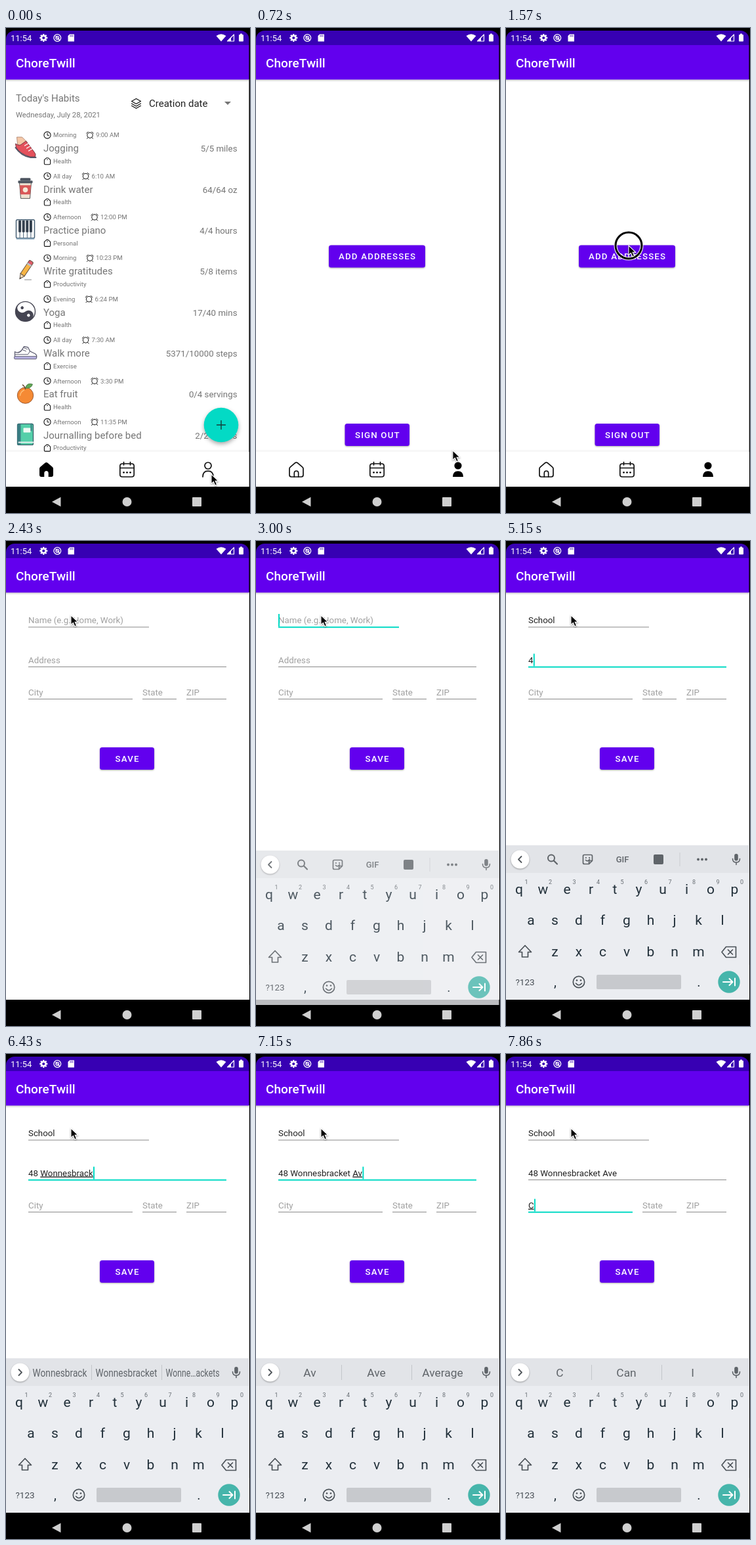
These frames come from a looping animation (372 by 738 pixels, 8000 ms). An HTML page:

```html
<!DOCTYPE html>
<html lang="en">
<head>
<meta charset="utf-8">
<title>Habit app walkthrough</title>
<style>
html, body { margin: 0; width: 100%; height: 100%; overflow: hidden; background: #000; }
svg { display: block; width: 372px; height: 738px; font-family: Roboto, sans-serif; }
text { white-space: pre; }
.mid { text-anchor: middle; }
.end { text-anchor: end; }
.bold { font-weight: 500; }
.line { fill: none; stroke: #111; stroke-linecap: round; stroke-linejoin: round; }
.raised { filter: drop-shadow(0 1.5px 1.2px #0005); }
</style>
</head>
<body>
<svg id="stage" viewBox="0 0 372 738"></svg>
<script>
const LOOP = 8000, STEP = 1000 / 7;
const PURPLE = '#6200ee', TEAL = '#03dac5', GREY = '#757575';

const text = (x, y, s, size, fill, cls = '') =>
  `<text x="${x}" y="${y}" font-size="${size}" fill="${fill}" class="${cls}">${s}</text>`;
const rect = (x, y, w, h, fill, rx = 0, extra = '') =>
  `<rect x="${x}" y="${y}" width="${w}" height="${h}" fill="${fill}" rx="${rx}" ${extra}/>`;
const disc = (x, y, r, fill, extra = '') => `<circle cx="${x}" cy="${y}" r="${r}" fill="${fill}" ${extra}/>`;
const shape = (d, fill, extra = '') => `<path d="${d}" fill="${fill}" ${extra}/>`;
const line = (d, w = 1, stroke = '#111') => `<path class="line" d="${d}" style="stroke:${stroke};stroke-width:${w}"/>`;
const at = (x, y, body) => `<g transform="translate(${x} ${y})">${body}</g>`;
const group = (id, body) => `<g id="${id}">${body}</g>`;
const ring = (x, y, r, w = 1, stroke = '#111') => disc(x, y, r, 'none', `stroke="${stroke}" stroke-width="${w}"`);

// Small icons, each drawn around 0,0
const clock = ring(0, 0, 5.1, 1.1) + line('M0-3V.3H2.5');
const alarm = ring(0, .2, 4.2) + line('M-5.3-2.6L-2.8-5M5.3-2.6L2.8-5M-3 3.7L-4.6 5.3M3 3.7L4.6 5.3');
const tag = line('M-4.6-1.8L-1.2-4.8H1.2L4.6-1.8V3.7Q4.6 5.2 3.2 5.2H-3.2Q-4.6 5.2-4.6 3.7Z', 1.1) + disc(0, -2.2, .8, '#111');

const pictures = {
  shoe: shape('M-13-16H-5L3-8-4-1-12-5Z', '#f4c8a8', 'stroke="#a67b68" stroke-width=".8"') +
    shape('M-15-6Q-9-2-6-5L1-10 13 6Q17 10 15 14H7Q-8 9-14 0Z', '#e4515c', 'stroke="#783b45"') +
    line('M-15 0Q-6 13 8 15H16', 2, '#555566') + line('M-1-3L4-6M2 1L7-2M5 5L10 2', 1.3, '#fff'),
  cup: shape('M-9-9H9L7 15H-7Z', '#f0e3d2', 'stroke="#555"') + shape('M-8.6-5H8.6L7.5 9H-7.5Z', '#d95858') +
    disc(0, 2, 3.8, '#f7ead8') + rect(-11, -12, 22, 4, '#4d5560', 1) + rect(-8, -16, 16, 4, '#4d5560', 1.5),
  piano: rect(-14, -15, 28, 28, '#fff', 2, 'stroke="#476075" stroke-width="1.5"') +
    line('M-8.4 0V13M-2.8 0V13M2.8 0V13M8.4 0V13', 1, '#476075') +
    [-10.4, -4.8, .8, 6.4].map(x => rect(x, -14, 4, 18, '#34404e', .8)).join('') + line('M-13 14H13', 2, '#8ca8bd'),
  pencil: `<g transform="rotate(34)">` + rect(-3.6, -12, 7.2, 20, '#f7b545', 0, 'stroke="#665544"') +
    rect(-3.6, -17, 7.2, 6, '#df5b68', 2, 'stroke="#665544"') + rect(-3.6, -12, 7.2, 2.5, '#b9c0c7') +
    shape('M-3.6 8H3.6L0 15Z', '#f5dcb8', 'stroke="#665544"') + shape('M-1.2 13H1.2L0 16Z', '#333') + '</g>' +
    line('M-1 14H9', 1, '#888'),
  yinyang: disc(0, 0, 15, '#fff', 'stroke="#454552" stroke-width="1.4"') +
    shape('M0-15A15 15 0 0 0 0 15A7.5 7.5 0 0 0 0 0A7.5 7.5 0 0 1 0-15', '#454552', 'transform="rotate(-40)"') +
    `<g transform="rotate(-40)">` + disc(0, -7.5, 2.3, '#454552') + disc(0, 7.5, 2.3, '#fff') + '</g>',
  sneaker: shape('M-16-1Q-10 2-6-3L-2-9 4-8 7-2 15 2Q18 4 17 8H-16Z', '#fff', 'stroke="#5c5c70" stroke-width="1.3"') +
    rect(-17, 6, 34, 4, '#b9b3e4', 1.5, 'stroke="#5c5c70"') + line('M-4-4L1-2M-2-7L3-5M7-2L4 3H-15', 1, '#5c5c70'),
  orange: disc(0, 3, 12.2, '#f58a34', 'stroke="#9c5b34"') + shape('M0-8Q2-17 11-14Q9-7 0-8', '#62a955', 'stroke="#3f6f3f" stroke-width=".8"') +
    line('M0-7Q-1-11-4-13', 1.6, '#6b4a35') + line('M-8 3Q-7-3-2-5', 1.5, '#ffc078'),
  book: rect(-12, -16, 24, 32, '#54cfa9', 2, 'stroke="#36606a" stroke-width="1.3"') + rect(-12, -16, 5, 32, '#397e83', 1) +
    rect(-3, -10, 11, 7, '#eefaf4', 1) + line('M-10 12H12', 2, '#e8f2f0') + line('M9-16V-6', 2, '#397e83')
};

const labelEnd = { Morning: 107, 'All day': 100.5, Afternoon: 114, Evening: 105.5 };
const habits = [
  ['shoe', 'Morning', '9:00 AM', 'Jogging', '5/5 miles', 'Health'],
  ['cup', 'All day', '6:10 AM', 'Drink water', '64/64 oz', 'Health'],
  ['piano', 'Afternoon', '12:00 PM', 'Practice piano', '4/4 hours', 'Personal'],
  ['pencil', 'Morning', '10:23 PM', 'Write gratitudes', '5/8 items', 'Productivity'],
  ['yinyang', 'Evening', '6:24 PM', 'Yoga', '17/40 mins', 'Health'],
  ['sneaker', 'All day', '7:30 AM', 'Walk more', '5371/10000 steps', 'Exercise'],
  ['orange', 'Afternoon', '3:30 PM', 'Eat fruit', '0/4 servings', 'Health'],
  ['book', 'Afternoon', '11:35 PM', 'Journalling before bed', '2/2 entries', 'Productivity']
];

const habitRow = ([pic, part, time, name, amount, kind], i) => {
  const y = 163 + 62.35 * i, x = labelEnd[part];
  return at(29.5, y + 19, pictures[pic]) + at(63, y, clock) + text(72, y + 3.4, part, 9.6, GREY) +
    at(x + 21, y, alarm) + text(x + 30, y + 3.4, time, 9.6, GREY) + text(57, y + 25.3, name, 15, GREY) +
    text(352.5, y + 25.3, amount, 13.3, GREY, 'end') + at(63, y + 39.5, tag) + text(72, y + 42.8, kind, 9.6, GREY);
};

const house = 'M-10.5-1.5Q-10.5-3-9-4.2L-2-10.2Q0-11.6 2-10.2L9-4.2Q10.5-3 10.5-1.5V8Q10.5 11 7.5 11H-7.5Q-10.5 11-10.5 8Z';
const door = 'M-3.2 11V5.5Q-3.2 2 0 2T3.2 5.5V11';
const calendar = line('M-7-9H7Q10.7-9 10.7-5.5V7.5Q10.7 11 7 11H-7Q-10.7 11-10.7 7.5V-5.5Q-10.7-9-7-9ZM-10.7-2.5H10.7M-5-11.5V-7M5-11.5V-7', 1.7) +
  [-5, 0, 5].map(x => disc(x, 4.3, 1.4, '#111')).join('');
const shoulders = 'M-8 11Q-8 2.2 0 2.2T8 11';

const tabs = home => rect(0, 642, 371, 3, '#000', 0, 'opacity=".03"') + rect(0, 645, 371, 53, '#fff') +
  at(61.5, 672, home ? shape(house, '#000') + shape(door, '#fff') : line(house, 1.7) + line(door, 1.7)) +
  at(184.5, 672, calendar) +
  at(308, 672, home ? ring(0, -6, 5, 1.7) + line(shoulders, 1.7)
    : disc(0, -6, 5.6, '#000') + shape(shoulders + 'Z', '#000'));

const button = (x, y, w, label) => rect(x, y, w, 34, PURPLE, 3.5, 'class="raised"') +
  `<text x="${x + w / 2 + .6}" y="${y + 21.8}" font-size="13.3" letter-spacing="1.15" fill="#fff" class="mid bold">${label}</text>`;
const paper = rect(0, 78, 371, 620, '#fff');

const homePage = paper + text(15, 112, "Today's Habits", 15, GREY) + text(15, 136, 'Wednesday, July 28, 2021', 11.3, GREY) +
  at(198.5, 114.5, line('M-7-3L0-7 7-3 0 1ZM-7 .5L0 4.5 7 .5M-7 3.8L0 7.8 7 3.8', 1.2)) +
  text(218, 119.5, 'Creation date', 15, '#222') + shape('M333 112H343L338 117Z', GREY) +
  habits.map(habitRow).join('') +
  disc(328, 604, 26.3, TEAL, 'style="filter:drop-shadow(0 3px 3px #0005)"') + line('M321.5 604H334.5M328 597.5V610.5', 1.4, '#143c39') +
  tabs(true);

const profilePage = paper + button(111, 330.5, 147, 'ADD ADDRESSES') + button(135.5, 602, 98.5, 'SIGN OUT') + tabs(false);

// "keys" holds the step at which each character is typed
const fields = [
  { x: 34, y: 125, w: 184, hint: 'Name (e.g. Home, Work)', text: 'School', keys: [24, 25, 27, 28, 29, 30], focus: 20 },
  { x: 34, y: 185.5, w: 302, hint: 'Address', text: '48 Wonnesbracket Ave', focus: 33,
    keys: [36, 37, 38, 39, 40, 41, 41, 42, 43, 44, 44, 45, 45, 45, 46, 47, 48, 49, 50, 51] },
  { x: 34, y: 234.5, w: 159, hint: 'City', text: 'C', keys: [55], focus: 52 },
  { x: 208, y: 234.5, w: 52, hint: 'State', text: '', keys: [], focus: 99 },
  { x: 275, y: 234.5, w: 61, hint: 'ZIP', text: '', keys: [], focus: 99 }
];
const formPage = paper + fields.map((f, i) => `<rect id="rule${i}" x="${f.x}" width="${f.w}"/>` +
  `<text id="field${i}" x="${f.x}" y="${f.y}" font-size="13.3"></text>`).join('') +
  rect(0, 0, 2, 19, TEAL, 0, 'id="caret"') + button(143, 314, 83, 'SAVE');

// Keyboard
const INK = '#22303a', DIM = '#5f6469';
const letters = (row, x, y) => [...row].map((c, i) => text(x + 36.5 * i, y, c, 21, INK, 'mid')).join('');
const slots = [34, 130, 237, 332];
const chevron = (id, d) => group(id, line(d, 1.8, '#50555a'));
const tools = at(71, 484.5, ring(-2, -2, 5, 2, DIM) + line('M2 2L7 7', 2.2, DIM)) +
  at(124.5, 484.5, line('M-7-5Q-7-7-5-7H5Q7-7 7-5V2L2 7H-5Q-7 7-7 5ZM7 2H4Q2 2 2 4V7M-3 1Q0 4 3 0', 1.7, DIM) + disc(-2.6, -2.5, 1.1, DIM) + disc(2.6, -2.5, 1.1, DIM)) +
  text(177.5, 489, 'GIF', 13, DIM, 'mid bold') + rect(225, 477, 15, 15, DIM, 2) + rect(264.5, 474, 1, 21, '#c9cbcf') +
  [-6, 0, 6].map(d => disc(299 + d, 484.5, 1.9, DIM)).join('');
const words = rect(130, 473, 1, 23, '#c3c6ca') + rect(237, 473, 1, 23, '#c3c6ca') +
  [0, 1, 2].map(i => `<text id="word${i}" font-size="17.4" fill="${DIM}" class="mid"></text>`).join('');
const keyboard = rect(0, 463, 371, 235, '#ebedf1') + rect(0, 463, 371, 42, '#e2e4e8') +
  disc(21.5, 484.5, 14, '#fff', 'class="raised"') + chevron('back', 'M23.5 480L19 484.5 23.5 489') + chevron('more', 'M19.5 480L24 484.5 19.5 489') +
  group('tools', tools) + group('words', words) +
  rect(348.2, 476, 5.6, 10.5, DIM, 2.8) + line('M345.5 483.5Q345.5 489 351 489T356.5 483.5M351 489V492.5', 1.6, DIM) +
  letters('qwertyuiop', 20, 536.5) + letters('asdfghjkl', 38, 583.5) + letters('zxcvbnm', 74.5, 631.5) +
  [...'1234567890'].map((c, i) => text(31 + 36.5 * i, 521.5, c, 9, '#666c72', 'mid')).join('') +
  line('M29 615.5L19.5 625.5H24.5V633H33.5V625.5H38.5Z', 1.7, '#4a5157') +
  line('M335.5 617.5H350.5V633.5H335.5L329 625.5ZM338.5 622L345.5 629M345.5 622L338.5 629', 1.7, '#4a5157') +
  text(29, 676, '?123', 13.5, '#444b52', 'mid') + text(75, 677.5, ',', 20, INK, 'mid') + text(294, 677.5, '.', 20, INK, 'mid') +
  ring(111, 671, 8.7, 1.7, '#4a5157') + disc(108, 668.5, 1.3, '#4a5157') + disc(114, 668.5, 1.3, '#4a5157') + line('M106.5 673Q111 678.5 115.5 673', 1.6, '#4a5157') +
  rect(138, 660, 129, 22, '#c7c9cd', 2) + disc(340, 671, 16.7, '#46b5ab') + line('M331 671H345M340.5 666L345.5 671 340.5 676M349 665.5V676.5', 2, '#fff');

const gear = ring(0, 0, 3.3, 2.4, '#fff') +
  [0, 45, 90, 135].map(a => `<path d="M0-6V-4M0 4V6" stroke="#fff" stroke-width="2.3" transform="rotate(${a})"/>`).join('');
const bars = rect(0, 4, 371, 22, '#3700b3') + rect(0, 26, 371, 52.5, PURPLE) +
  rect(0, 78.5, 371, 1.2, '#000', 0, 'opacity=".2"') + rect(0, 79.7, 371, 2, '#000', 0, 'opacity=".06"') +
  text(15, 60, 'ChoreTwill', 19.1, '#fff', 'bold') + text(7, 19.6, '11:54', 13, '#fff') +
  at(57.3, 15, gear) + ring(78.3, 15, 5.4, 1.3, '#fff') + ring(78.3, 15, 2.4, 1.2, '#fff') + line('M76 12.6L82 18.8', 1.3, '#fff') +
  shape('M97 9.5H104V20.5H94.5V12Z', '#fff') + line('M98 11V13M100 11V13M102 11V13', .8, '#3700b3') +
  shape('M320.5 12Q328 6.5 335.5 12L328 20.5Z', '#fff') + line('M337.5 20L347.5 10V20Z', 1.2, '#fff') + shape('M337.5 20L343 14.5V20Z', '#fff') +
  rect(355, 10, 7, 10.5, '#fff', 1) + rect(357, 8.6, 3, 2, '#fff');
const softKeys = shape('M70 721L83.5 713.8V728.2Z', '#cfcfcf') + disc(184.5, 721, 7, '#cfcfcf') + rect(284, 714, 14, 14, '#cfcfcf', 1);
const pointer = group('pointer', group('press', ring(0, 0, 20, 5, '#fff') + ring(0, 0, 20, 3, '#000')) +
  shape('M0 0V14.5L3.4 11.4 5.9 17 8.6 15.8 6.2 10.4H10.8Z', '#000', 'stroke="#fff" stroke-width="1.1" style="filter:drop-shadow(0 1px 1px #0006)"'));

stage.innerHTML = '<clipPath id="screen"><rect y="4" width="370.5" height="760" rx="13"/></clipPath>' +
  rect(0, 0, 372, 738, '#000') + '<g clip-path="url(#screen)">' +
  group('home', homePage) + group('profile', profilePage) + group('form', formPage) + bars +
  group('keyboard', keyboard) + softKeys + '</g>' + pointer;

const $ = id => document.getElementById(id);
const set = (id, attrs) => { for (const a in attrs) $(id).setAttribute(a, attrs[a]); };
const show = (id, on) => set(id, { visibility: on ? 'visible' : 'hidden' });
const clamp = v => Math.max(0, Math.min(1, v));
const mix = (a, b, p) => a + (b - a) * p;

const path = [[4, 313, 679], [9, 187, 331], [14, 187, 331], [15, 140, 205], [16, 98, 101], [17, 99, 113]];
const presses = [1, 2, 10, 11, 19];

function pointerAt(k) {
  const i = path.findIndex(p => p[0] >= k);
  if (i === 0) return path[0].slice(1);
  if (i < 0) return path[path.length - 1].slice(1);
  const [a, b] = [path[i - 1], path[i]];
  let p = (k - a[0]) / (b[0] - a[0]);
  p = p * p * (3 - 2 * p);
  return [mix(a[1], b[1], p), mix(a[2], b[2], p)];
}

const guesses = {
  S: ['So', 'See'], Sc: ['Scale', 'School'], W: ['We', 'What'], Wo: ['Would', 'Work'],
  A: ['And', 'All'], Av: ['Ave', 'Average'], Ave: ['Avenue', 'Average'], C: ['Can', 'I']
};
const suggest = w => [w, ...(guesses[w] || (w.startsWith('Sch') ? ['School', 'Schedule'] : ['Wonnesbracket', 'Wonne…ackets']))];

function drawForm(k) {
  const active = fields.filter(f => f.focus <= k).pop();
  let word = '';
  show('caret', false);
  fields.forEach((f, i) => {
    const on = f === active, el = $('field' + i);
    const typed = f.text.slice(0, f.keys.filter(n => n <= k).length);
    const tail = on ? typed.match(/[A-Za-z]*$/)[0] : '';
    el.innerHTML = typed ? typed.slice(0, typed.length - tail.length) + `<tspan text-decoration="underline">${tail}</tspan>` : f.hint;
    el.setAttribute('fill', typed ? '#212121' : '#a0a0a0');
    set('rule' + i, { y: f.y + (on ? 5.2 : 5.5), height: on ? 2 : 1, fill: on ? TEAL : '#8a8a8a' });
    if (!on) return;
    word = tail;
    const last = Math.max(f.focus, ...f.keys.filter(n => n <= k));
    set('caret', { x: f.x + (typed ? el.getComputedTextLength() + .3 : 0), y: f.y - 14 });
    show('caret', (k - last) * STEP % 1000 < 500);
  });
  return word;
}

function drawKeyboard(k, word) {
  const p = clamp((k - 19) / 3);
  set('keyboard', { transform: `translate(0 ${216 * (1 - p) ** 3})`, opacity: p ? .4 + .6 * p : 0 });
  const on = word !== '';
  for (const [id, v] of [['back', !on], ['tools', !on], ['more', on], ['words', on]]) set(id, { display: v ? 'inline' : 'none' });
  if (!on) return;
  suggest(word).forEach((s, i) => {
    const el = $('word' + i), room = slots[i + 1] - slots[i] - 13;
    el.textContent = s;
    // long suggestions condense to their slot
    const squeeze = Math.min(1, room / el.getComputedTextLength());
    el.setAttribute('transform', `translate(${(slots[i] + slots[i + 1]) / 2} 491) scale(${squeeze} 1)`);
  });
}

let drawn = -1;
function render(now) {
  const k = Math.floor((now % LOOP + 5) / STEP) % 56;
  if (k !== drawn) {
    drawn = k;
    set('profile', { opacity: clamp((k - 2) / 2) });
    set('form', { opacity: clamp((k - 11) / 2) });
    drawKeyboard(k, drawForm(k));
    set('pointer', { transform: `translate(${pointerAt(k)})` });
    show('press', presses.includes(k));
  }
}
const start = performance.now();
function tick() {
  render(performance.now() - start);
  requestAnimationFrame(tick);
}
tick();
</script>
</body>
</html>
```
